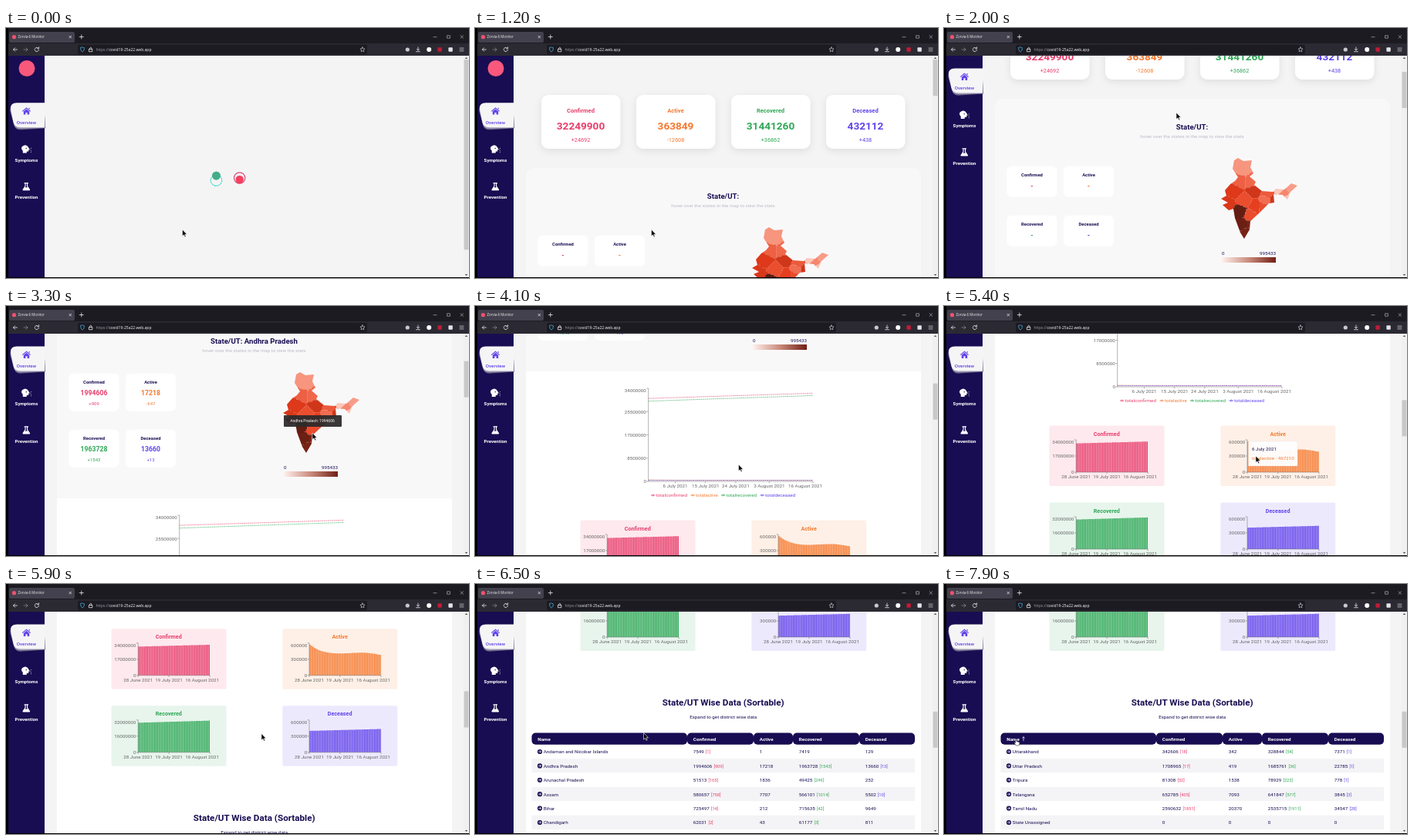
These frames come from a looping animation (600 by 325 pixels, 8000 ms). An HTML page:

```html
<!DOCTYPE html>
<html lang="en">
<head>
<meta charset="utf-8">
<title>Dashboard</title>
<style>
html, body { margin: 0; width: 100%; height: 100%; overflow: hidden; background: #000; }
svg { display: block; width: 600px; height: 325px; font-family: Roboto, Arial, sans-serif; }
.ui { font-family: "Open Sans", "Noto Sans", sans-serif; }
.line { fill: none; stroke: #e8e8ec; stroke-width: .8; stroke-linecap: round; stroke-linejoin: round; }
.axis { fill: none; stroke: #666; stroke-width: .5; }
.card { filter: drop-shadow(0 3px 5px #00000016); }
</style>
</head>
<body>
<svg id="stage" viewBox="0 0 600 325"></svg>
<script>
const NAVY = '#180d52', PINK = '#e83e6c', ORANGE = '#f5792f', GREEN = '#2fa857', PURPLE = '#6244ea';
const COLORS = [PINK, ORANGE, GREEN, PURPLE];
const LABELS = ['Confirmed', 'Active', 'Recovered', 'Deceased'];

// y is the middle of the capitals
const text = (x, y, s, size = 6.25, fill = NAVY, anchor = 'start', weight = 400) =>
  `<text x="${x}" y="${y + size * .37}" font-size="${size}" fill="${fill}" text-anchor="${anchor}" font-weight="${weight}">${s}</text>`;
const title = (x, y, s, size, fill = NAVY) => text(x, y, s, size, fill, 'middle', 700);
const rect = (x, y, w, h, fill, r = 0, more = '') =>
  `<rect x="${x}" y="${y}" width="${w}" height="${h}" rx="${r}" fill="${fill}" ${more}/>`;
const path = (d, fill, more = '') => `<path d="${d}" fill="${fill}" ${more}/>`;
const line = (d, more = '') => `<path class="line" d="${d}" ${more}/>`;
const axis = d => `<path class="axis" d="${d}"/>`;
const dot = (x, y, r, fill, more = '') => `<circle cx="${x}" cy="${y}" r="${r}" fill="${fill}" ${more}/>`;
const group = (y, body) => `<g transform="translate(0 ${y})">${body}</g>`;
const each = (n, f) => Array.from({ length: n }, (_, i) => f(i)).join('');

function browser() {
  return rect(3, 0, 597, 20, '#1c1b22') + rect(3, 20, 597, 16, '#2b2a33') +
    rect(4, 5, 85, 14, '#42414d', 2) + dot(10.5, 11.7, 2.6, '#f0506e') +
    `<g class="ui">${text(15.5, 11.7, 'Zorvia-6 Monitor', 4.4, '#f2f2f5')}</g>` +
    line('M82 10.3l2.6 2.6m0-2.6l-2.6 2.6M95.3 11.5h5M97.8 9v5', 'stroke-width=".6"') +
    line('M554 11.7h4M572 9.8h3.4v3.4H572zM589 9.7l3.6 3.6m0-3.6l-3.6 3.6', 'style="stroke-width:.5"') +
    rect(93, 21.7, 375, 12.6, '#1c1b22', 2) +
    line('M14.5 28h-5m2.2-2.2L9.5 28l2.2 2.2') + line('M23 28h5m-2.2-2.2L28 28l-2.2 2.2', 'opacity=".45"') +
    line('M42 26.4a2.6 2.6 0 1 0 .5 2M42.6 24.8v2h-2') +
    line('M99 25l2.5.8q0 4-2.5 5.4-2.5-1.4-2.5-5.4z', 'style="stroke:#4aa8d8"') +
    line('M107.8 27.5h4v3.2h-4zM108.6 27.5v-1.3q1.2-2.2 2.4 0v1.3') +
    `<g class="ui"><text x="116.4" y="29.9" font-size="5" fill="#fbfbfe"><tspan fill="#9c9ba6">https://</tspan>covid19-25a22.web.app</text></g>` +
    line('M462 24.9l.9 1.9 2.1.3-1.5 1.5.3 2.1-1.8-1-1.8 1 .3-2.1-1.5-1.5 2.1-.3z', 'style="stroke-width:.6"') +
    dot(520.3, 28, 2.6, '#c9c8d0') + line('M534 25v4m-1.7-1.6l1.7 1.7 1.7-1.7M531.6 30.7h4.8') +
    dot(548.2, 28, 3, '#fff') + rect(559.4, 25.3, 5.4, 5.4, '#c01c36', 1) + rect(573.4, 25.3, 5.4, 5.4, '#e4e4e8', 1) +
    line('M588 26h5m-5 2h5m-5 2h5', 'style="stroke-width:.6"');
}

function sidebar() {
  const tab = 'M50 97.3H14Q5.4 97.6 6 105L9.5 122Q10.5 129.2 19 129.2H50Z';
  return dot(27, 52.5, 10.5, '#f8587c') +
    ['#6f688a', '#a5a0b8', '#f6f5f6'].map((fill, i) =>
      path(tab, fill, `transform="rotate(${2 * i - 4} 50 113) translate(0 ${1 - i / 2})"`)).join('') +
    path('M26.5 103.2l5.6 4.8-.8.8-4.8-4.1-4.8 4.1-.8-.8zM29.5 103.8h1.2v2.2l-1.2-1zM22.8 108.6l3.7-3.1 3.7 3.1v4h-2.6v-2.7h-2.2v2.7h-2.6z', PURPLE) +
    text(26.5, 122.3, 'Overview', 6.2, PURPLE, 'middle', 500) +
    path('M21 154q5-4 8 1l1.6 3-1.4.4v2.2h-2.4v2h-5v-3q-3-3-.8-5.6z', '#fff') + dot(26.2, 156.5, .7, NAVY) +
    line('M31 158h.1M32.4 156.4h.1M32.4 159.6h.1M32.3 161.5h.1') +
    title(26.5, 171.7, 'Symptoms', 6.2, '#fff') +
    path('M23.6 201h5.4v1.3h-.9v3.2l3 4.4q.3 1.3-1 1.3h-7.6q-1.3 0-1-1.3l3-4.4v-3.2h-.9z', '#fff') +
    path('M25.6 202.3h1.4v3.6l1 1.4h-3.4l1-1.4z', NAVY) +
    title(26.5, 220, 'Prevention', 6.2, '#fff');
}

function summary() {
  const totals = ['32249900 +24692', '363849 -12608', '31441260 +36862', '432112 +438'];
  return totals.map((s, i) => {
    const x = 86 + i * 123, mid = x + 51, [total, change] = s.split(' ');
    return rect(x, 87, 102.5, 70, '#fff', 9, 'class="card"') +
      title(mid, 107, LABELS[i], 7.6, COLORS[i]) + title(mid, 127.4, total, 13.6, COLORS[i]) +
      text(mid, 145.6, change, 7.3, COLORS[i], 'middle');
  }).join('');
}

const COUNTRY = `M376 172L381 169 388 173 399 172 397 181 401 189 396 193 404 200 402 204 412 212 426 213 430 209 441 210
  450 202 458 205 449 213 445 223 439 217 427 216 428 227 421 228 408 241 397 251 396 262 389 274 384 266 377 247 375 235
  369 237 361 230 368 227 359 222 366 218 364 211 371 203 377 199 381 194 374 183Z`;
// centre and shade of each state; a point belongs to the nearest centre
const STATES = [[387, 182, .25], [382, 199, .45], [398, 199, .42], [376, 211, .62], [366, 228, .63], [401, 211, .66],
  [389, 223, .52], [419, 215, .48], [416, 223, .4], [427, 223, .66], [403, 231, .58], [414, 232, .53], [383, 239, 1],
  [396, 243, .53], [400, 254, .92], [384, 254, .97], [391, 267, .94], [434, 208, .06], [440, 214, .3], [450, 207, .22], [446, 221, .08]];

function map() {
  const step = 1.4, cells = STATES.map(() => '');
  for (let y = 168; y < 275; y += step) for (let x = 358; x < 459; x += step) {
    const far = STATES.map(([a, b]) => Math.hypot(a - x, b - y));
    cells[far.indexOf(Math.min(...far))] += `M${x.toFixed(1)} ${y.toFixed(1)}h1.5v1.5h-1.5z`;
  }
  return `<g clip-path="url(#country)">` + cells.map((d, i) => {
    const s = STATES[i][2];
    return path(d, `hsl(${12 - 4 * s} ${95 - 26 * s}% ${90 - 67 * s}%)`);
  }).join('') + '</g>';
}

function stateInfo(id, name, height, gap, rows) {
  return `<g id="${id}">` + title(321.5, 128.4, 'State/UT:' + name, 9.65) + rows.map((s, i) => {
    const [total, change = ''] = s.split(' ');
    const x = 81.5 + i % 2 * 73.5, mid = x + 32.5, y = 231.7 + (i > 1 ? gap : -gap - height);
    return rect(x, y, 65, height, '#fff', 6) + title(mid, y + 11, LABELS[i], 5.9) +
      title(mid, y + 25.5, total, 8.7, COLORS[i]) + text(mid, y + 39.3, change, 6, COLORS[i], 'middle');
  }).join('') + '</g>';
}

function statePanel() {
  return rect(66, 92, 512, 260, '#f9f8f9', 10) +
    text(321.5, 141.2, 'hover over the states in the map to view the stats', 6.2, '#bdbac4', 'middle') +
    stateInfo('none', '', 40, 12, LABELS.map(() => '-')) +
    stateInfo('picked', ' Andhra Pradesh', 49, 12, ['1994606 +909', '17218 -647', '1963728 +1543', '13660 +13']) +
    map() + rect(360, 298, 70, 7, 'url(#scale)') + text(360, 292.5, '0') + text(430, 292.5, '995433', 6.25, NAVY, 'end') +
    `<g id="mapTip">${rect(360, 225, 75, 15, '#2d2b2b', 1, 'opacity=".94"')}${text(397, 232.5, 'Andhra Pradesh: 1994606', 5, '#fff', 'middle')}</g>`;
}

// people in millions on each of the 50 days
const DAYS = 50;
const SERIES = [
  i => 30.3 + i * .039,
  i => .405 + .165 * Math.exp(-i / 8) + .016 * Math.sin((i - 26) / 8) - .0025 * Math.max(0, i - 38),
  i => 29.3 + i * .042,
  i => .398 + i * .0007
];
const date = day => new Date(2021, 5, 28 + day).toLocaleDateString('en-GB', { day: 'numeric', month: 'long', year: 'numeric' });

function axes(x, top, bottom, width, max, steps, days) {
  return axis(`M${x} ${top}V${bottom}h${width}`) +
    each(steps + 1, i => {
      const y = top + (bottom - top) * i / steps;
      return axis(`M${x - 2.4} ${y}h2.4`) + text(x - 2.8, i ? y : y + 2.8, Math.round(max * 1e6 * (1 - i / steps)), 6.25, '#666', 'end');
    }) +
    days.map(day => {
      const at = x + width * day / (DAYS - 1);
      return axis(`M${at} ${bottom}v2.2`) + text(Math.min(at, x + width - 10), bottom + 5.8, date(day), 6.25, '#666', 'middle');
    }).join('');
}

function lineChart() {
  const keyX = [228, 279.5, 319, 369.5];
  return axes(224.7, 107, 228, 213.3, 34, 4, [0, 8, 17, 26, 36, 49].slice(1)) +
    SERIES.map((value, k) => {
      const points = each(DAYS, i => `${224.7 + i * 4.353} ${228 - value(i) * 121 / 34} `), x = keyX[k];
      return path('M' + points, 'none', `stroke="${COLORS[k]}" stroke-width=".8" stroke-dasharray="2 .6" opacity=".7"`) +
        path(`M${x} 246h5.4`, 'none', `stroke="${COLORS[k]}" stroke-width=".8"`) +
        dot(x + 2.7, 246, 1, '#fff', `stroke="${COLORS[k]}" stroke-width=".7"`) +
        text(x + 6.6, 245.8, 'total' + LABELS[k].toLowerCase(), 6.2, COLORS[k]);
    }).join('');
}

function barCards() {
  const peaks = [34, .6, 32, .6];
  return SERIES.map((value, k) => {
    const x = 136.5 + k % 2 * 221.8, left = x + 34.7;
    const bars = each(DAYS, i => `M${(left + .3 + i * 1.86).toFixed(2)} 216v${(-42 * value(i) / peaks[k]).toFixed(2)}h1.35V216z`);
    return group((k >> 1) * 100, rect(x, 155.5, 149, 78.5, COLORS[k], 2, 'opacity=".115"') +
      title(x + 74.3, 166, LABELS[k], 7.2, COLORS[k]) + path(bars, COLORS[k]) +
      axes(left, 174, 216, 93, peaks[k], 2, [0, 21, 49]));
  }).join('') +
    `<g id="barTip">${rect(394.5, 176, 63.5, 32, '#fff', 1, 'opacity=".96" stroke="#ddd" stroke-width=".4"')}${text(399, 185.3, date(8))}${text(399, 197.2, 'totalactive : 467210', 6.25, ORANGE)}</g>`;
}

const COLS = [73.5, 275, 361, 412, 498, 570];
const FIRST = ['Andaman and Nicobar Islands|7549 1|1|7419|129', 'Andhra Pradesh|1994606 909|17218|1963728 1543|13660 13',
  'Arunachal Pradesh|51513 165|1836|49425 249|252', 'Assam|580657 758|7707|566101 1014|5502 10',
  'Bihar|725497 14|212|715635 42|9649', 'Chandigarh|62031 2|43|61177 3|811'];
const LAST = ['Uttarakhand|342606 18|342|328844 54|7371 1', 'Uttar Pradesh|1708965 17|419|1685761 36|22785 1',
  'Tripura|81308 52|1538|78929 223|778 1', 'Telangana|652785 405|7093|641847 577|3845 3',
  'Tamil Nadu|2590632 1851|20370|2535715 1911|34547 28', 'State Unassigned|0|0|0|0'];

function tableRows(id, rows) {
  const cell = (s, k, y) => {
    if (!k) return text(88.8, y, s);
    const [total, change] = s.split(' ');
    const extra = change ? `<tspan dx="2" font-size="5.7" fill="${COLORS[k - 1]}">[${change}]</tspan>` : '';
    return text(COLS[k] + 7.8, y, total + extra);
  };
  return `<g id="${id}">` + rows.map((row, i) => {
    const y = 218 + i * 18.4;
    return rect(73.5, y - 9.2, 496.5, 18.4, i % 2 ? '#f4f3f5' : '#fff') + dot(84, y, 3.1, NAVY) +
      line(`M82.3 ${y}h3.2m-1.4-1.5l1.5 1.5-1.5 1.5`) + row.split('|').map((s, k) => cell(s, k, y)).join('');
  }).join('') + '</g>';
}

function table() {
  return title(321.7, 154, 'State/UT Wise Data (Sortable)', 11.7) +
    text(321.7, 172.6, 'Expand to get district wise data', 6.25, NAVY, 'middle') +
    tableRows('first', FIRST) + tableRows('last', LAST) +
    ['Name', ...LABELS].map((s, k) => rect(COLS[k], 193.5, COLS[k + 1] - COLS[k], 15.2, NAVY, 5) +
      text(COLS[k] + 7.8, 201.2, s, 6.25, '#fff', 'start', 700)).join('') +
    line('M103 203.8v-5m-1.3 1.4l1.3-1.4 1.3 1.4', 'id="sortMark"');
}

const loader = () =>
  dot(272.5, 198, 7.2, 'none', 'stroke="#2fdcc4" stroke-width="1.2" stroke-dasharray="2.2 .8"') +
  dot(272.5, 192, 5.5, '#42ad8a', 'id="ballA"') +
  dot(302.7, 195, 7.2, 'none', 'stroke="#d8457a" stroke-width="1.2"') + dot(302.7, 197, 5.2, '#f2405f', 'id="ballB"');

const stage = document.getElementById('stage');
stage.innerHTML = `<defs>
  <clipPath id="view"><rect x="3" y="36" width="590" height="288"/></clipPath>
  <clipPath id="country"><path d="${COUNTRY}"/></clipPath>
  <linearGradient id="scale"><stop stop-color="#fff1ec"/><stop offset=".5" stop-color="#c98b7c"/><stop offset="1" stop-color="#711f13"/></linearGradient>
  </defs>` +
  rect(0, 0, 600, 325, '#000') + rect(3, 36, 597, 288, '#f5f4f5') +
  `<g clip-path="url(#view)"><g id="page">` + summary() + group(90, statePanel()) + rect(66, 423, 512, 900, '#fff') +
  group(338, lineChart()) + group(461, barCards()) + group(708, table()) + '</g>' +
  `<g id="loader">${loader()}</g>` + rect(3, 36, 47, 288, NAVY) + `<g id="side">${sidebar()}</g></g>` + browser() +
  rect(593, 36, 7, 288, '#f0f0f0') + rect(593.5, 41, 6, 47, '#c8c8c8', 0, 'id="thumb"') +
  path('M594.7 40l1.8-2 1.8 2zM594.7 320l1.8 2 1.8-2z', '#555') +
  `<g id="pointer">` + path('M0 0V8.6L2 6.8 3.4 9.8 4.7 9.2 3.4 6.3H6z', '#000', 'id="arrow" stroke="#fff" stroke-width=".6"') +
  path('M0 .6q.9-1 1.5 0v3l3.4.9q.8.4.5 1.8l-.7 2.7H.8L-1.4 5.6q0-1 1.4-.1z', '#fff', 'id="hand" stroke="#111" stroke-width=".5"') + '</g>';

const el = id => document.getElementById(id);
const show = (id, on) => el(id).setAttribute('visibility', on ? 'visible' : 'hidden');
const move = (id, x, y) => el(id).setAttribute('transform', `translate(${x} ${y})`);

// each stop: set off, arrive, scroll, pointer x, pointer y
const STOPS = [[0, 0, 0, 228.5, 262], [1200, 1800, 90, 301, 110], [2100, 2700, 173, 397, 165], [3600, 4000, 338, 341.5, 206],
  [4400, 5100, 461, 404, 195], [5600, 6300, 708, 218.5, 193.5], [6500, 7100, 708, 92.5, 201]];

function pose(t) {
  const i = STOPS.findLastIndex(stop => stop[0] <= t);
  const [start, end, ...to] = STOPS[i], from = STOPS[Math.max(0, i - 1)].slice(2);
  const u = Math.min(1, (t - start) / (end - start || 1)), e = u * u * (3 - 2 * u);
  return to.map((v, k) => from[k] + (v - from[k]) * e);
}

function draw() {
  const t = Math.floor(performance.now() % 8000 / 100) * 100;
  const [scroll, x, y] = pose(t), loading = t < 700, picked = t >= 2700, sorted = t >= 7300, hand = t >= 7000;
  move('page', 0, -scroll);
  move('side', 0, -Math.min(scroll, 44.7));
  move('pointer', x, y);
  show('loader', loading);
  el('page').style.display = loading ? 'none' : '';
  el('ballA').setAttribute('cy', 198 - 6 * Math.abs(Math.cos(t * Math.PI / 600)));
  el('ballB').setAttribute('cy', 197 - 6 * Math.abs(Math.sin(t * Math.PI / 600)));
  el('thumb').setAttribute('y', 41.2 + scroll * .176);
  el('thumb').setAttribute('height', loading ? 247 : 47);
  show('none', !picked);
  show('picked', picked);
  show('mapTip', picked && t < 3600);
  show('barTip', t >= 5100 && t < 5700);
  show('first', !sorted);
  show('last', sorted);
  show('sortMark', sorted);
  show('arrow', !hand);
  show('hand', hand);
  requestAnimationFrame(draw);
}
draw();
</script>
</body>
</html>
```
